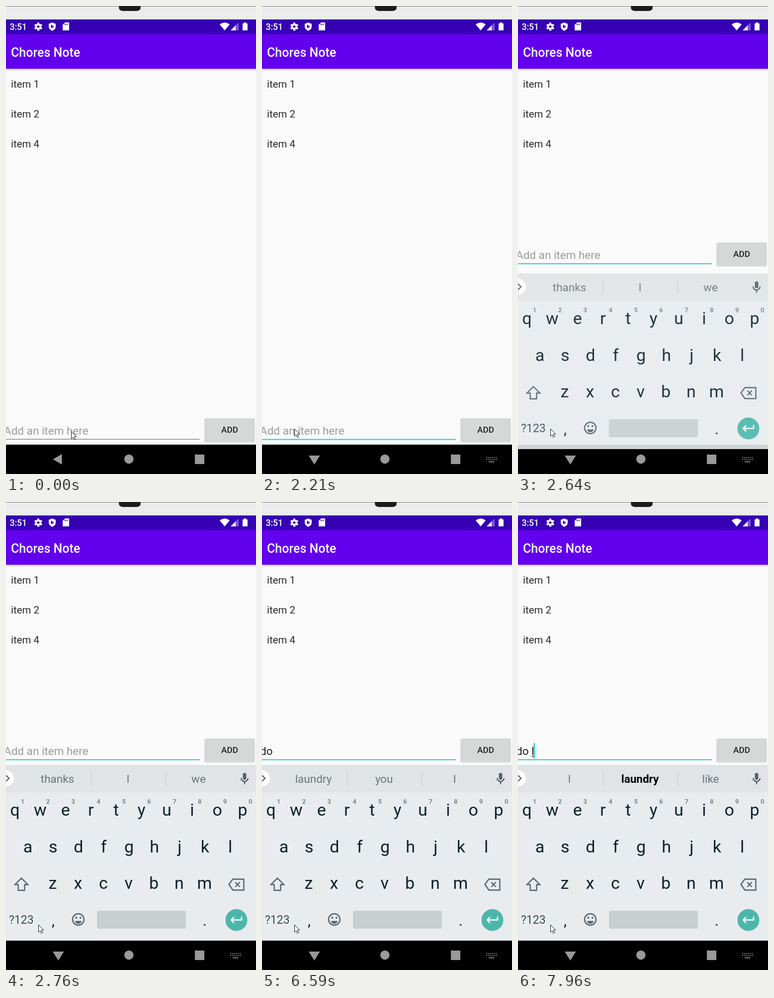
Animation of 503x940 px, one loop 8000 ms. Source, as an HTML page:

```html
<!DOCTYPE html>
<html lang="en">
<head>
<meta charset="utf-8">
<title>Chores Note</title>
<style>
  html, body { margin: 0; width: 100%; height: 100%; overflow: hidden; background: #fafafa; }
  svg { display: block; width: 100vw; height: 100vh; }
  text { font-family: Roboto, sans-serif; white-space: pre; }
  .medium { font-weight: 500; }
  .middle text, text.middle { text-anchor: middle; }
  .line { fill: none; stroke: #56636a; stroke-width: 2.4; }
</style>
</head>
<body>
<svg viewBox="0 0 503 940">
  <defs>
    <linearGradient id="barShadow" x2="0" y2="1">
      <stop stop-color="#000" stop-opacity=".2"/>
      <stop offset="1" stop-color="#000" stop-opacity="0"/>
    </linearGradient>
  </defs>
  <rect width="503" height="940" fill="#fafafa"/>

  <!-- Device top and status bar -->
  <rect width="503" height="27" fill="#ebeceb"/>
  <rect width="503" height="1" fill="#777"/>
  <path d="M227 0H271V2Q271 10 262 10H236Q227 10 227 2Z" fill="#1b1b1b"/>
  <rect y="27" width="503" height="30" fill="#3700b3"/>
  <g fill="#fff">
    <text class="medium" x="7.5" y="48" font-size="17.5">3:51</text>
    <g id="gear" transform="translate(65 41.5)">
      <circle r="4.3" fill="none" stroke="#fff" stroke-width="3.4"/>
    </g>
    <path d="M93 33L100 36V41Q100 47 93 50Q86 47 86 41V36Z"/>
    <path d="M90.5 37.5V45L97 41.2Z" fill="#3700b3"/>
    <path d="M119 33H126Q127 33 127 34V48Q127 49 126 49H115Q114 49 114 48V38Z"/>
    <path d="M118.5 35.5v3m2.5-3v3m2.5-3v3" stroke="#3700b3" stroke-width="1.3"/>
    <path d="M430 37.2Q440 29.5 450 37.2L440 49Z"/>
    <path d="M468 33V49H452Z" opacity=".35"/>
    <path d="M462 39V49H452Z"/>
    <path d="M479 33H483V35H486V49H476V35H479Z"/>
  </g>

  <!-- App bar and list -->
  <rect y="126" width="503" height="5" fill="url(#barShadow)"/>
  <rect y="56.5" width="503" height="69.5" fill="#6200ee"/>
  <text class="medium" x="10" y="101.5" font-size="25" fill="#fff">Chores Note</text>
  <g font-size="20.4" fill="#2c2c2c">
    <text x="10" y="164">item 1</text>
    <text x="10" y="224">item 2</text>
    <text x="10" y="284">item 4</text>
  </g>

  <!-- Entry row, placed at its raised position -->
  <g id="entry">
    <text id="hint" x="-4" y="508" font-size="22.5" fill="#9c9c9c">Add an item here</text>
    <text id="typed" x="-4" y="508" font-size="22.5" fill="#222"></text>
    <rect id="composing" y="510" height="1.5" fill="#333"/>
    <rect id="caret" y="484" width="2.2" height="31" fill="#03cdba"/>
    <rect id="underline" width="390"/>
    <rect x="399" y="476" width="102" height="47.5" rx="3" fill="#000" opacity=".12"/>
    <rect x="399.5" y="475" width="100.5" height="46.5" rx="2" fill="#d6d7d7"/>
    <text class="medium middle" x="450" y="504" font-size="17.3" fill="#222">ADD</text>
  </g>

  <!-- Navigation bar -->
  <rect y="881" width="503" height="59" fill="#000"/>
  <g fill="#999">
    <path id="back"/>
    <circle cx="247.3" cy="910" r="9.3"/>
    <rect x="380" y="901" width="19" height="19" rx="1"/>
    <path id="switcher" d="M451 907h21M451 911h21" stroke="#888" stroke-width="2" stroke-dasharray="2 1.8"/>
    <path id="switcherBase" d="M456 915.5h11" stroke="#888" stroke-width="2"/>
  </g>

  <g id="keyboard">
    <rect y="528" width="503" height="353" fill="#e8ecef"/>
    <rect y="528" width="503" height="55" fill="#e0e4e6"/>
    <circle cy="555" r="16" fill="#fff"/>
    <path class="line" d="M0 549L6 555L0 561"/>
    <path d="M171.5 540V570M321.5 540V570" stroke="#c3c9cc"/>
    <g id="suggestions" class="middle" font-size="22.5"></g>
    <rect x="476.5" y="544" width="7" height="14" rx="3.5" fill="#56636a"/>
    <path class="line" d="M473 554.5a7 7 0 0 0 14 0M480 561.5V567" stroke-width="2"/>
    <g id="letters" class="middle" font-size="34" fill="#0d2029"></g>
    <g id="digits" class="middle medium" font-size="13" fill="#6b777d"></g>
    <path class="line" d="M31 755.5L44 768.5H37.5V780H24.5V768.5H18Z"/>
    <path class="line" d="M448.5 768L456.5 757.5H478.5V779.5H456.5ZM461.5 763.5L470.5 773M470.5 763.5L461.5 773"/>
    <text x="6" y="847" font-size="23" fill="#3d4c53">?123</text>
    <text class="middle" x="95" y="851" font-size="30" fill="#0d2029">,</text>
    <text class="middle" x="400" y="851" font-size="30" fill="#0d2029">.</text>
    <circle class="line" cx="145.5" cy="838.5" r="11.5"/>
    <path d="M138.5 841.5H152.5Q150.5 847 145.5 847T138.5 841.5Z" fill="#56636a"/>
    <circle cx="141.3" cy="835" r="1.9" fill="#56636a"/>
    <circle cx="149.7" cy="835" r="1.9" fill="#56636a"/>
    <rect x="183" y="821" width="179" height="36" rx="3" fill="#c9ced1"/>
    <circle cx="463.5" cy="839.5" r="22" fill="#4db6ac"/>
    <path d="M474 832.5V839.5H453.5M459 833.5L453 839.5L459 845.5" fill="none" stroke="#fff" stroke-width="2.5"/>
  </g>

  <path id="pointer" d="M.5 .5V15L3.8 12L6.2 17.3L8.6 16.2L6.3 11H11Z" fill="#fff" stroke="#111"/>
</svg>
<script>
const LOOP = 8000;
const FOCUS = 1230, NAV_CHANGE = 2210, RAISE = 2360, KEYS_IN = 2640, KEYS_SET = 2760;
const $ = id => document.getElementById(id);
const set = (id, attrs) => {
  for (const name in attrs) $(id).setAttribute(name, attrs[name]);
};
const label = (text, x, y, extra = '') => `<text x="${x}" y="${y}" ${extra}>${text}</text>`;

const STEP = 50.9;
const keyRow = (chars, x, y) => [...chars].map((c, i) => label(c, x + i * STEP, y)).join('');
$('letters').innerHTML =
  keyRow('qwertyuiop', 18, 630) + keyRow('asdfghjkl', 44, 704) + keyRow('zxcvbnm', 94, 777);
$('digits').innerHTML = keyRow('1234567890', 33.5, 606);
$('gear').innerHTML += Array.from({ length: 6 }, (_, i) =>
  `<rect x="-2" y="-8.2" width="4" height="4" rx=".5" transform="rotate(${i * 60})"/>`).join('');

// time, x, y
const pointerPath = [
  [0, 131, 854], [130, 119, 854], [300, 100, 853],
  [420, 82, 852], [550, 70, 850], [670, 65, 849]
];

// time, committed text, composing text, caret shown, suggestions, middle one bold
const idle = ['thanks', 'I', 'we'];
const afterDo = ['laundry', 'you', 'I'];
const typing = [
  [0, '', '', true, idle, false],
  [5660, '', 'f', true, ['f', 'for', 'from'], true],
  [5790, '', '', true, idle, false],
  [6060, '', 'd', true, ['d', 'do', 'did'], true],
  [6180, '', 'do', true, ["don't", 'do', 'did'], true],
  [6300, 'do ', '', true, afterDo, false],
  [6590, 'do ', '', false, afterDo, false],
  [6990, 'do ', 'k', true, ['k', 'know', 'kids'], true],
  [7550, 'do ', 'k', false, ['k', 'know', 'kids'], true],
  [7680, 'do ', '', true, afterDo, false],
  [7960, 'do ', 'l', true, ['l', 'laundry', 'like'], true]
];

const latest = (steps, t) => steps.findLast(step => step[0] <= t);
const ruler = document.createElement('canvas').getContext('2d');
const widthOf = text => {
  ruler.font = '22.5px Roboto, sans-serif';
  return ruler.measureText(text).width;
};
const show = (id, on) => set(id, { visibility: on ? 'visible' : 'hidden' });

let shownStep;
function drawTyping(step) {
  if (step === shownStep) return;
  shownStep = step;
  const [, committed, composing, caret, words, bold] = step;
  const start = widthOf(committed) - 4;
  const length = widthOf(composing);
  $('typed').textContent = committed + composing;
  show('hint', !(committed + composing));
  set('composing', { x: start, width: length });
  set('caret', { x: start + length - 1 });
  show('caret', caret);
  $('suggestions').innerHTML = words.map((word, i) =>
    label(word, [103.5, 245.5, 387.5][i], 564,
      bold && i === 1 ? 'font-weight="700" fill="#000"' : 'fill="#6c7579"')).join('');
}

function draw(t) {
  const [, x, y] = latest(pointerPath, t);
  set('pointer', { transform: `translate(${x} ${y})` });
  set('entry', { transform: `translate(0 ${t < RAISE ? 353 : 0})` });
  set('underline', t < FOCUS
    ? { y: 516.5, height: 1.5, fill: '#8b8b8b' }
    : { y: 516.6, height: 2, fill: '#22d0be' });
  set('back', { d: t < NAV_CHANGE ? 'M94.5 910.5L112.5 900V921Z' : 'M94 903H116.5L105.3 921Z' });
  show('switcher', t >= NAV_CHANGE);
  show('switcherBase', t >= NAV_CHANGE);
  show('keyboard', t >= KEYS_IN);
  const settling = t < KEYS_SET;
  set('keyboard', { transform: `translate(0 ${settling ? 9 : 0})`, opacity: settling ? 0.9 : 1 });
  drawTyping(latest(typing, t));
}

const began = performance.now();
function tick() {
  draw((performance.now() - began) % LOOP);
  requestAnimationFrame(tick);
}
tick();
</script>
</body>
</html>
```
